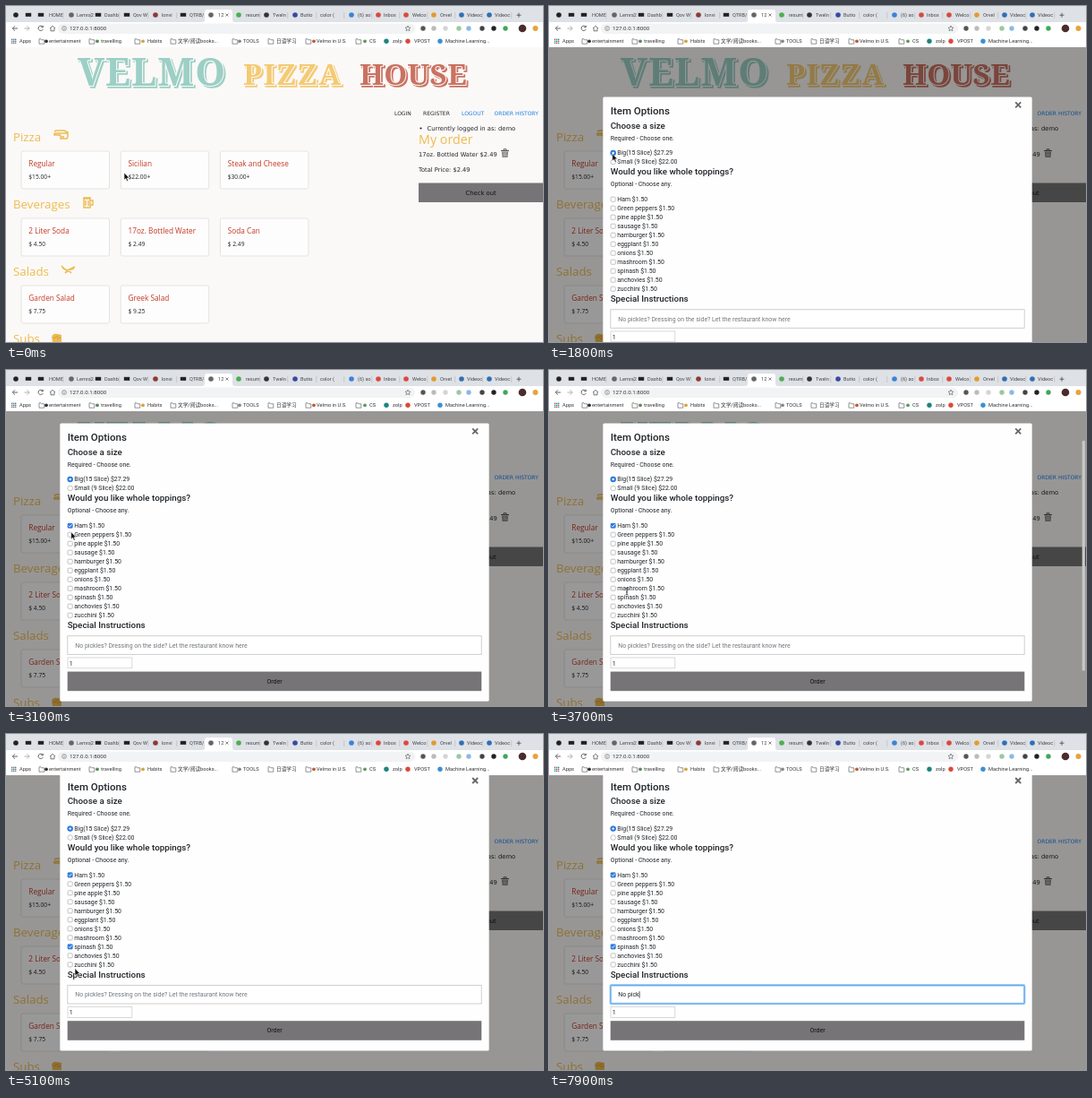
An HTML page that plays this animation: 600 by 375 pixels, repeating every 8 s.

```html
<!DOCTYPE html>
<html lang="en">
<head>
<meta charset="utf-8">
<title>Pizza order</title>
<style>
html, body { margin: 0; width: 100%; height: 100%; overflow: hidden; background: #fbf9f7; }
svg { display: block; width: 100%; height: 100%; }
text { font-family: Roboto, "Noto Sans CJK SC", sans-serif; white-space: pre; }
.hand { font-family: "Open Sans", "Noto Sans", sans-serif; }
.wide { font-family: "DejaVu Sans", sans-serif; }
.slab { font-family: "Noto Serif", serif; font-weight: 900; }
.head { font-weight: 500; }
</style>
</head>
<body>
<svg id="stage" viewBox="0 0 600 375"></svg>
<script>
const LOOP = 8000;
const INK = '#212529', ORANGE = '#edbb52', BLUE = '#1b7fe6', GREY = '#767476';

const text = (x, y, size, str, fill = INK, extra = '') =>
  `<text x="${x}" y="${y}" font-size="${size}" fill="${fill}" ${extra}>${str}</text>`;
const rect = (x, y, w, h, fill, extra = '') =>
  `<rect x="${x}" y="${y}" width="${w}" height="${h}" fill="${fill}" ${extra}/>`;
const dot = (x, y, r, fill, extra = '') =>
  `<circle cx="${x}" cy="${y}" r="${r}" fill="${fill}" ${extra}/>`;
const line = (d, stroke, width = 1, extra = '') =>
  `<path d="${d}" fill="none" stroke="${stroke}" stroke-width="${width}" ${extra}/>`;
const shape = (d, fill, extra = '') => `<path d="${d}" fill="${fill}" ${extra}/>`;
const hand = (x, y, size, str, fill) => text(x, y, size, str, fill, 'class="hand"');
const wide = (x, y, size, str, fill) => text(x, y, size, str, fill, 'class="wide"');

// ---- shop page ----
function sign(x, y, size, str, color, spacing) {
  const attrs = `class="slab" letter-spacing="${spacing}"`;
  return text(x + 2, y + 1.5, size, str, color, `${attrs} stroke="${color}" stroke-width="1.6"`) +
    text(x, y, size, str, color, `${attrs} stroke="#fbf9f7" stroke-width="2.2" paint-order="stroke"`);
}

function card(x, y, name, price) {
  return rect(x, y, 98.5, 42, '#fefdfd', 'rx="2" stroke="#dfdddc" stroke-width=".8"') +
    hand(x + 8.3, y + 16.8, 8.25, name, '#c23a26') +
    hand(x + 8.3, y + 31, 6.7, price, '#222');
}

function section(y, name, items) {
  return hand(8, y, 13.3, name, ORANGE) +
    items.map(([n, p], i) => card(17 + i * 111.2, y + 11.5, n, p)).join('');
}

const trash = line('M553 161.5h9M556 161v-1.2h3v1.2', '#555', 1) +
  shape('M553.8 162.5h7.4l-.7 6.5h-6z', '#858585') +
  line('M556 163.5v4.5M557.5 163.5v4.5M559 163.5v4.5', '#ddd', .5);

const icons =
  line('M69 142h-13q-3 0-2 2h7M61 139h-5l-2 1M61 144v4h7l1-2v-5l-4-2h-4M62 146h3', ORANGE, 1.5) +
  line('M87 215h7v10h-7zM94 217h3v5h-3M89 217v6M92 217v6M86 214h9', ORANGE, 1.4) +
  line('M63 292l5 3 8-2M66 298l5-4 6-3M69 294l4 4M62 290l4 4', ORANGE, 1.7) +
  shape('M51 369q2-4 6-3l5 1v8h-10z', ORANGE) + line('M53 371l6-3M57 372l4-2', '#c98d2c', .7);

const page = rect(0, 46, 600, 329, '#fbf9f7') +
  sign(80, 89, 43, 'VELMO', '#9ccfc5', 1) +
  sign(265, 88, 33, 'PIZZA', '#f4ca74', 1.5) +
  sign(395, 88, 33, 'HOUSE', '#ca7262', .3) +
  wide(434, 122.4, 6, 'LOGIN') + wide(466, 122.4, 6, 'REGISTER') +
  wide(509, 122.4, 6, 'LOGOUT', BLUE) + wide(545.5, 122.4, 6, 'ORDER HISTORY', BLUE) +
  section(150.5, 'Pizza', [['Regular', '$15.00+'], ['Sicilian', '$22.00+'], ['Steak and Cheese', '$30.00+']]) +
  section(225.5, 'Beverages', [['2 Liter Soda', '$ 4.50'], ['17oz. Bottled Water', '$ 2.49'], ['Soda Can', '$ 2.49']]) +
  section(300.5, 'Salads', [['Garden Salad', '$ 7.75'], ['Greek Salad', '$ 9.25']]) +
  section(375.5, 'Subs', []) + icons +
  dot(463.5, 136.5, 1.1, INK) + wide(470.5, 138.8, 6.8, 'Currently logged in as: demo') +
  hand(461, 154, 14.3, 'My order', ORANGE) +
  wide(461, 167.8, 6.7, '17oz. Bottled Water $2.49') + trash +
  wide(461, 184.6, 6.7, 'Total Price: $2.49') +
  rect(461, 197.5, 139, 21.5, GREY) + wide(513.5, 210.6, 6.8, 'Check out', '#111');

// ---- order dialog, laid out at scroll 0 ----
const toppings = ['Ham', 'Green peppers', 'pine apple', 'sausage', 'hamburger', 'eggplant',
  'onions', 'mashroom', 'spinash', 'anchovies', 'zucchini'];
const rowY = i => 215.7 + i * 10;
const head = (y, size, str) => text(68.7, y, size, str, INK, 'class="head"');
const ring = y => dot(71.7, y, 2.8, '#fff', 'stroke="#aaa" stroke-width=".7"');
const tick = (id, y) => `<g id="${id}">` + rect(68.8, y - 2.8, 5.7, 5.7, '#2a7be4', 'rx="1"') +
  line(`M70 ${y}l1.3 1.4 2.2-2.9`, '#fff', .9) + '</g>';

const dialog = rect(60.3, 101.5, 479.4, 310.3, '#fefefe', 'rx="1.5"') +
  line('M521.2 107.4l6 6M527.2 107.4l-6 6', '#666', 1.8) +
  head(121.2, 11.5, 'Item Options') +
  head(136.6, 9.8, 'Choose a size') +
  text(68.7, 149.6, 6.93, 'Required - Choose one.') +
  ring(164) + ring(174) +
  `<g id="picked">${dot(71.7, 164, 3.2, '#2a7be4')}${dot(71.7, 164, 1.2, '#fff')}</g>` +
  text(76.3, 166.4, 6.93, 'Big(15 Slice) $27.29') +
  text(76.3, 176.4, 6.93, 'Small (9 Slice) $22.00') +
  head(188.4, 9.8, 'Would you like whole toppings?') +
  text(68.7, 201.3, 6.93, 'Optional - Choose any.') +
  toppings.map((name, i) =>
    rect(69.1, rowY(i) - 2.5, 5.1, 5.1, '#fff', 'rx="1" stroke="#aaa" stroke-width=".7"') +
    text(76.3, rowY(i) + 2.4, 6.93, name + ' $1.50')).join('') +
  tick('ham', rowY(0)) + tick('spinash', rowY(8)) +
  head(330, 9.8, 'Special Instructions') +
  rect(68.8, 338.8, 462.4, 20.6, '#fff', 'stroke="#c9c9c9" stroke-width=".9"') +
  `<g id="focus">${rect(68.8, 338.8, 462.4, 20.6, 'none', 'rx="1" stroke="#a9d2fb" stroke-width="2.6"')}` +
  rect(68.8, 338.8, 462.4, 20.6, 'none', 'rx="1" stroke="#5aa5ea" stroke-width="1"') + '</g>' +
  text(77.3, 351.6, 6.93, 'No pickles? Dressing on the side? Let the restaurant know here', '#70767c', 'id="hint"') +
  text(77.3, 351.6, 6.93, '', INK, 'id="note"') +
  rect(0, 345.6, .7, 7.4, '#111', 'id="caret"') +
  rect(69, 363, 71.8, 11.8, '#fff', 'stroke="#cfcfcf" stroke-width=".8"') +
  text(70.8, 371.6, 7, '1') +
  rect(68.7, 378.6, 462.6, 21.6, GREY) +
  text(300, 391.9, 6.93, 'Order', '#111', 'text-anchor="middle"');

// ---- browser frame: [icon x, icon color, text x, label] ----
const tabs = [
  [11, '#222'], [25, '#222'], [39, '#222', 48, 'HOME'], [73, '#666', 79, 'Lemra2'],
  [103, '#222', 110, 'Dashb'], [135, '#222', 142, 'Qov W'], [167, '#8c3a35', 174, 'lonvi'],
  [198, '#222', 205, 'QTRB/'], [229, '#666', 237, '12'], [260, '#4caf50', 268, 'resum'],
  [291, '#333', 298, 'Tweln'], [323, '#3949a0', 329, 'Butto'], [0, '', 351, 'color ('],
  [386, '#3b82d8', 393, '(6) so'], [416, '#d94a3d', 422, 'Inbox'], [447, '#d94a3d', 454, 'Welco'],
  [478, '#e59a2f', 485, 'Orvel'], [509, '#2f6fb4', 515, 'Videoc'], [540, '#2f6fb4', 546, 'Videoc']];
// [folder x, icon x, icon color, text x, label]
const marks = [
  [37, 45, '#333', 48, 'entertainment'], [93, 102, '#5a8a5a', 106, 'travelling'],
  [144, 153, '#d6a43e', 158, 'Habits'], [184, 0, '', 192, '文学/阅读books...'],
  [253, 261, '#888', 265, 'TOOLS'], [293, 0, '', 302, '日语学习'],
  [335, 344, '#c05c3a', 347, 'Velmo in U.S.'], [391, 401, '#5b9a5b', 406, 'CS'],
  [0, 425, '#1b8580', 432, 'zolp'], [0, 449, '#d94a3d', 456, 'VPOST'],
  [0, 485, '#3b8fd8', 491, 'Machine Learning...']];
const tools = [[466, '#555'], [478, '#bbb'], [491, '#d5d5d5'], [506, '#9cc7a0'], [517, '#8bb8e8'],
  [532, '#444'], [545, '#222'], [558, '#3fa65a']];
const folder = x => line(`M${x} 36.8h2l.8 1h3v4.4h-5.8z`, '#666', .7);

const frame = rect(0, 0, 600, 19, '#dee1e6') + rect(0, 18, 600, 28, '#fff') +
  shape('M219 18q3 0 3-3V7q0-3 3-3h25q3 0 3 3v8q0 3 3 3z', '#fff') +
  tabs.map(([ix, color, tx, label], i) =>
    (color ? (color === '#222' && i ? rect(ix - 3.2, 7.8, 6.4, 4, color) : dot(ix, 10, 2.8, color)) : '') +
    (label ? text(tx, 12, 5.6, label, '#444') : '')).join('') +
  [63, 94, 126, 158, 190, 283, 314, 346, 377, 408, 439, 470, 501, 532, 564]
    .map(x => line(`M${x + .7} 7v7`, '#aeb1b6', .5)).join('') +
  line('M245.5 8.5l3 3M248.5 8.5l-3 3', '#555', .7) +
  line('M570.5 10.2h5M573 7.7v5', '#444', .8) +
  line('M13 25h-5.5M10 22.3l-2.7 2.7 2.7 2.7', '#555', .9) +
  line('M20.5 25h5.5M23.5 22.3l2.7 2.7-2.7 2.7', '#aaa', .9) +
  line('M41 23.3a2.7 2.7 0 1 0 .3 2.6M41.3 21.8v2h-2', '#555', .9) +
  line('M49 25l3-2.7 3 2.7M50 24.6v3.2h4v-3.2', '#555', .8) +
  rect(58, 19.5, 399, 11.4, '#f1f3f4', 'rx="5.7"') +
  dot(65, 25, 2.4, 'none', 'stroke="#666" stroke-width=".6"') + line('M65 24.6v1.7M65 23.5v.5', '#666', .7) +
  text(71, 27.2, 6.2, '127.0.0.1:8000', '#333') +
  shape('M449 22l.9 2 2.1.2-1.6 1.4.5 2.1-1.9-1.1-1.9 1.1.5-2.1-1.6-1.4 2.1-.2z', 'none', 'stroke="#555" stroke-width=".6"') +
  tools.map(([x, c]) => dot(x, 25, 2.7, c)).join('') +
  dot(577, 25, 4.3, '#4a2c2c') + dot(591.5, 25, 3, '#e8a33d') +
  [0, 1, 2].flatMap(r => [0, 1, 2].map(c =>
    rect(6 + c * 2, 36.6 + r * 2, 1.4, 1.4, ['#db4437', '#4285f4', '#0f9d58'][(r + c) % 3]))).join('') +
  text(15, 41.2, 5.7, 'Apps', '#333') +
  marks.map(([fx, ix, color, tx, label]) => (fx ? folder(fx) : '') +
    (color ? dot(ix, 39.3, fx ? 1.9 : 2.7, color) : '') + text(tx, 41.2, 5.7, label, '#333')).join('');

const stage = document.getElementById('stage');
stage.innerHTML = page +
  `<g id="modal">${rect(0, 46, 600, 329, '#000', 'opacity=".4"')}<g id="dialog">${dialog}</g>` +
  rect(595.7, 0, 3.2, 257, '#c9c7c5', 'id="thumb" rx="1.6"') + '</g>' + frame +
  `<g id="cursor">${shape('M0 0v8.2l1.9-1.7 1.3 3 1.4-.6-1.3-2.9h2.5z', '#111', 'id="arrow" stroke="#fff" stroke-width=".6"')}` +
  line('M-1.5-3.7q1.5 0 1.5 1v5.6q0 1-1.5 1M1.5-3.7q-1.5 0-1.5 1M0 2.9q0 1 1.5 1M-.8.8h1.6', '#222', .8, 'id="beam"') + '</g>';

// ---- motion: rows of [ms, ...values] ----
const scrollKeys = [[1850, 0], [2200, 34.7], [2450, 42], [3950, 42], [4400, 58.4]];
const cursorKeys = [[0, 132, 186], [300, 150, 181], [500, 150, 181], [1400, 70.7, 164.8], [2250, 70.7, 164.8],
  [2700, 71, 173], [3000, 71, 173], [3500, 87, 247], [4100, 87, 247], [4500, 71, 236],
  [4800, 71, 236], [5100, 77, 261.5], [5600, 100, 290]];
const typed = 'No pick', typeStart = 6500, typeStep = 215;

function at(keys, t) {
  const n = keys.findIndex(k => k[0] > t);
  if (n === 0) return keys[0].slice(1);
  if (n < 0) return keys[keys.length - 1].slice(1);
  const a = keys[n - 1], b = keys[n];
  const p = (t - a[0]) / (b[0] - a[0]), e = p * p * (3 - 2 * p);
  return a.slice(1).map((v, i) => v + (b[i + 1] - v) * e);
}

const el = {};
stage.querySelectorAll('[id]').forEach(node => el[node.id] = node);
const show = (id, on) => el[id].setAttribute('visibility', on ? 'inherit' : 'hidden');
const move = (id, x, y) => el[id].setAttribute('transform', `translate(${x} ${y})`);

function draw(now) {
  const t = Math.floor(now % LOOP / 100) * 100;
  const within = (a, b) => t >= a && t < b;
  const [scroll] = at(scrollKeys, t);
  const [x, y] = at(cursorKeys, t);

  show('modal', t >= 500);
  move('dialog', 0, -scroll);
  el.thumb.setAttribute('y', 46 + scroll * .78);
  show('thumb', within(1900, 3000) || within(3500, 4800));

  show('picked', t >= 1600);
  show('ham', t >= 2900);
  show('spinash', t >= 4700);

  const focused = t >= 5800;
  const count = t < typeStart ? 0 : Math.min(typed.length, 1 + Math.floor((t - typeStart) / typeStep));
  show('focus', focused);
  show('hint', !count);
  el.note.textContent = typed.slice(0, count);
  el.caret.setAttribute('x', 77.4 + (count ? el.note.getComputedTextLength() : 0));
  show('caret', focused);

  const overText = within(3300, 4300) || t >= 5500;
  move('cursor', x, y);
  show('cursor', t < typeStart);
  show('arrow', !overText);
  show('beam', overText);
  requestAnimationFrame(draw);
}
requestAnimationFrame(draw);
</script>
</body>
</html>
```
